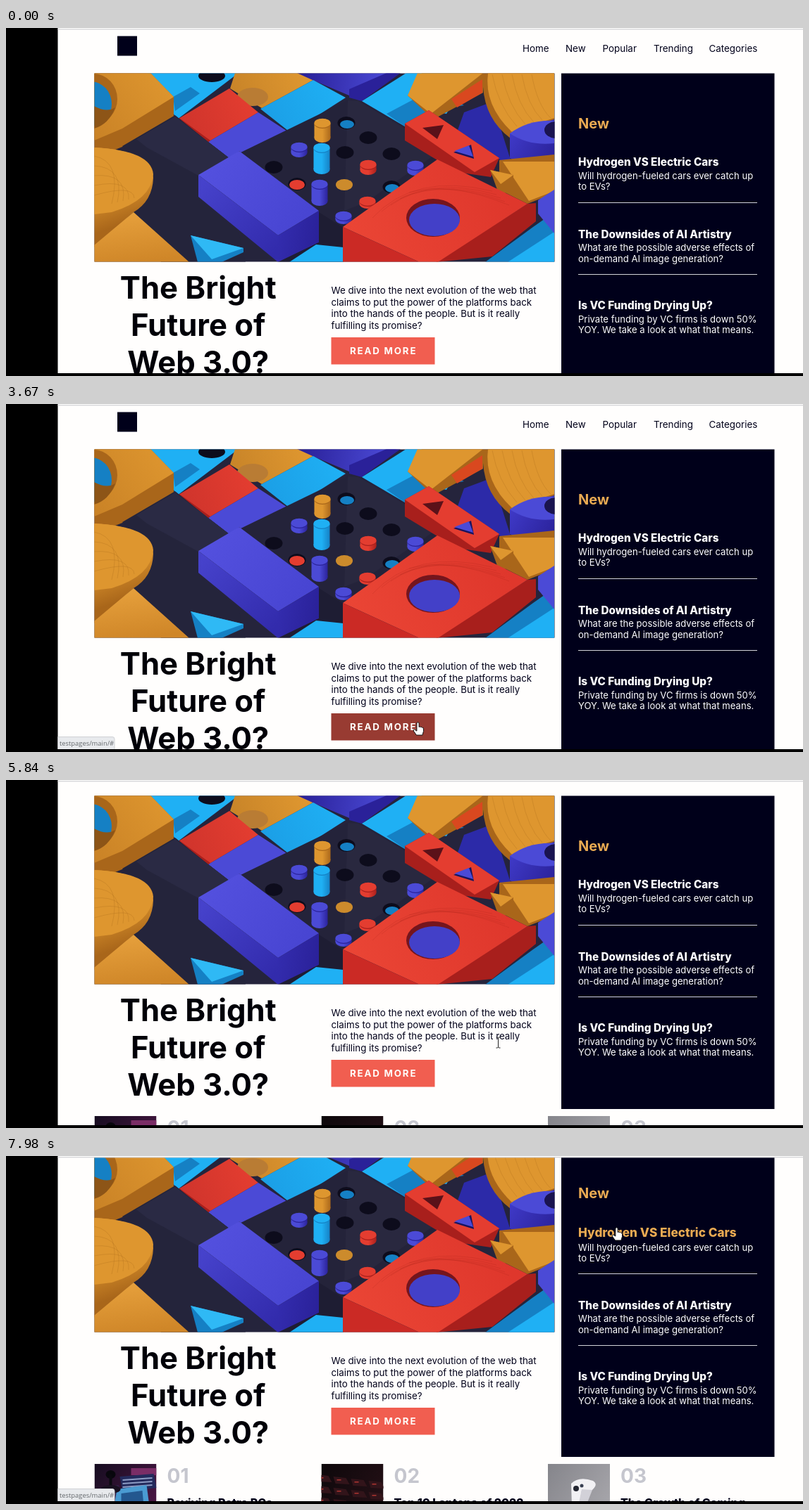
Animation of 1131x495 px, one loop 8000 ms. Source, as an HTML page with a canvas:

```html
<!DOCTYPE html>
<html lang="en">
<head>
<meta charset="utf-8">
<title>News page</title>
<style>
html, body { margin: 0; width: 100%; height: 100%; overflow: hidden; background: #000; }
canvas { display: block; width: 1131px; height: 495px; }
</style>
</head>
<body>
<canvas id="stage" width="1131" height="495"></canvas>
<script>
const ctx = document.getElementById('stage').getContext('2d');
const LOOP = 8000;
const NAVY = [0, 0, 26], BLACK = [0, 0, 0], RED = [241, 94, 80], GOLD = [233, 170, 82], WHITE = [255, 255, 255];
const PAPER = '#fffefd';
const ORANGE = '#de962f', RUST = '#a9661a', INDIGO = '#4b4ad6', DEEP = '#2a2199';
const CYAN = '#1fb0f4', SEA = '#1580c4', SCARLET = '#e43d30', BRICK = '#a81f1c', COAL = '#25243c', PIT = '#0d0c1c';

const clamp = v => Math.max(0, Math.min(1, v));
const smooth = v => v * v * (3 - 2 * v);
const span = (t, a, b) => clamp((t - a) / (b - a));
const rgb = c => `rgb(${c.map(Math.round)})`;
const mix = (a, b, p) => rgb(a.map((v, i) => v + (b[i] - v) * p));

// the CSS "ease" curve
function ease(x) {
  let lo = 0, hi = 1, s = x;
  for (let i = 0; i < 18; i++) {
    s = (lo + hi) / 2;
    const q = 1 - s;
    if (.75 * s * q + s ** 3 < x) lo = s; else hi = s;
  }
  const q = 1 - s;
  return .3 * s * q * q + 3 * s * s * q + s ** 3;
}

// rises after `on`, falls after `off`
const hover = (t, on, off, ms) => ease(span(t, on, on + ms)) - ease(span(t, off, off + ms));

function text(str, x, y, size, weight, color, align = 'left', gap = 0) {
  ctx.font = `${weight} ${size}px Inter, Arial, sans-serif`;
  ctx.textAlign = align;
  ctx.letterSpacing = gap + 'px';
  ctx.fillStyle = color;
  ctx.fillText(str, x, y);
}

function box(x, y, w, h, color) {
  ctx.fillStyle = color;
  ctx.fillRect(x, y, w, h);
}

function blend(x0, y0, x1, y1, ...tones) {
  const g = ctx.createLinearGradient(x0, y0, x1, y1);
  tones.forEach((c, i) => g.addColorStop(i / (tones.length - 1), c));
  return g;
}

function shape(d, color) {
  ctx.fillStyle = color;
  ctx.fill(new Path2D(d));
}

function oval(x, y, rx, ry, color) {
  ctx.fillStyle = color;
  ctx.beginPath();
  ctx.ellipse(x, y, rx, ry, 0, 0, 7);
  ctx.fill();
}

function peg(x, y, h, top, side) {
  const body = blend(x - 12, y, x + 12, y, top, top, side);
  oval(x, y + h, 11.5, 7, body);
  box(x - 11.5, y, 23, h, body);
  oval(x, y, 11.5, 7, side);
  oval(x, y - .8, 11.5, 6.5, top);
}

function clipTo(x, y, w, h) {
  ctx.beginPath();
  ctx.rect(x, y, w, h);
  ctx.clip();
}

function blocks() {
  ctx.save();
  clipTo(125.5, 64.5, 653, 268);
  box(125, 64, 654, 269, COAL);
  // back row
  shape('M200 64H330L243 130Z', CYAN);
  shape('M237 98L262 84L275 93L240 118Z', SEA);
  shape('M325 64H420L436 74L363 114L318 86Z', blend(330, 100, 420, 64, '#c98529', ORANGE));
  oval(350, 98, 22, 13, '#b97c34');
  oval(292, 68, 19, 9, PIT);
  shape('M413 64H555L487 96L435 74Z', blend(420, 64, 540, 80, DEEP, INDIGO));
  shape('M487 87L540 64H560L505 104L487 99Z', DEEP);
  shape('M505 104L568 64H660L625 122L600 117L566 140Z', CYAN);
  shape('M540 122L600 90L650 110L600 117L566 140Z', SEA);
  shape('M590 64H677V92L606 130L570 96Z', RUST);
  shape('M584 64H677L603 122L570 96Z', ORANGE);
  shape('M632 101L676 73V92L640 113Z', '#d9481f');
  // right side
  shape('M650 120L690 105L720 200L700 187L640 148Z', '#2c2aa8');
  shape('M677 64H778V138L716 157Q680 130 677 84Z', RUST);
  shape('M684 64H778V128L718 148Q678 110 684 64Z', ORANGE);
  shape('M715 150L778 130V196L738 196L715 185Z', blend(715, 150, 778, 190, '#3f3ac8', DEEP));
  shape('M715 150Q742 130 778 132V164Q742 168 715 150Z', INDIGO);
  oval(781, 145, 17, 12, '#1a1450');
  shape('M700 188L778 180V235L740 250L700 230Z', RUST);
  shape('M705 190L778 190V232L742 246Z', ORANGE);
  // tiles
  shape('M243 130L317 86L358 120L287 162Z', blend(250, 140, 350, 100, '#cf342c', SCARLET));
  shape('M287 162L358 120L404 150L345 186L331 175L318 186Z', INDIGO);
  shape('M361 115L436 74L482 99L404 149Z', blend(370, 130, 470, 80, '#1b9fe6', CYAN));
  shape('M243 130L246 128L290 160L287 162Z', BRICK);
  // left orange arch and disc
  shape('M125 64H205L238 98V126L165 169L125 185Z', RUST);
  shape('M125 64H205L238 98L165 143L125 160Z', blend(125, 160, 238, 80, '#c98226', ORANGE));
  oval(124, 101, 34, 36, RUST);
  oval(120, 108, 30, 32, SEA);
  shape('M125 111Q143 121 155 113Q146 137 125 143Z', '#8d5517');
  shape('M165 168L240 124L287 162L318 186L273 210L274 245L330 290L340 333H220L180 262L210 215Z', '#24243b');
  shape('M240 126L287 162L318 186L273 210L200 170L185 158Z', '#2a2a44');
  shape('M125 170Q206 174 209 213Q208 246 181 262L125 312Z', blend(170, 215, 190, 270, ORANGE, RUST));
  shape('M125 170Q206 174 209 208Q206 245 150 262L125 265Z', ORANGE);
  shape('M125 309L181 262L260 333H125Z', blend(181, 262, 190, 333, '#e6a03c', '#cf8628'));
  // peg board
  shape('M485 103L620 172L610 200L478 288L440 262L331 178Z', '#24233a');
  shape('M485 103L500 104L618 174L510 248L480 260Z', '#29283f');
  const holes = [[483, 135], [514, 156], [481, 177], [547, 179], [380, 198], [547, 226]];
  holes.forEach(([x, y], i) => {
    oval(x, y, 12.5, 9, PIT);
    if (i === 0 || i === 5) oval(x + 1, y + 2, 10, 6, SEA);
  });
  peg(449, 136, 20, ORANGE, RUST);
  peg(416, 170, 7, INDIGO, DEEP);
  peg(514, 195, 7, SCARLET, BRICK);
  peg(581, 196, 7, INDIGO, DEEP);
  peg(448, 171, 30, CYAN, SEA);
  oval(413, 222, 12.5, 9, PIT);
  oval(413, 223, 11, 7, SCARLET);
  oval(480, 223, 12, 8, '#cc8b2c');
  peg(513, 247, 3, SCARLET, BRICK);
  peg(445, 223, 23, INDIGO, DEEP);
  peg(479, 268, 4, INDIGO, DEEP);
  // indigo beam
  shape('M273 209L331 175L444 260L386 295Z', blend(290, 190, 420, 275, '#5350de', '#4845d2'));
  shape('M386 295L444 260V305L386 333Z', blend(386, 290, 444, 300, '#332cae', DEEP));
  shape('M273 209L386 295V333L273 240Z', blend(280, 220, 380, 320, '#4642cb', '#322bac'));
  // front corner pieces
  shape('M444 262L479 284V333H386L444 305Z', '#1e1d33');
  shape('M402 333L440 308L479 312V333Z', CYAN);
  shape('M262 295L337 313V319L306 333H272Z', SEA);
  shape('M262 295L337 313L292 329Z', '#2fb9f5');
  // red blocks
  shape('M566 136L600 117L700 185L688 212L640 205L566 160Z', BRICK);
  shape('M566 136L600 117L700 185L665 205Z', SCARLET);
  shape('M591 142L621 138L612 158Z', '#5b1119');
  shape('M635 177L660 166L664 186Z', '#19145e');
  shape('M636 175L657 167L663 183Z', INDIGO);
  shape('M687 202L720 209V230L700 238Z', RUST);
  shape('M687 202L720 209L702 222Z', ORANGE);
  shape('M680 333L748 283L778 262V333Z', SEA);
  shape('M712 333L778 290V333Z', CYAN);
  shape('M755 245L778 230V292L755 264Z', INDIGO);
  shape('M740 250L752 249V275L690 325L610 333Z', BRICK);
  shape('M478 283L612 187L740 250L602 340Z', blend(490, 300, 700, 210, '#ea4535', '#df372c'));
  shape('M478 283L602 340H478Z', '#cb2a25');
  oval(606, 270, 38, 27, '#75151d');
  oval(608, 273, 36, 23, '#4340c8');
  // light grain on the big faces
  ctx.lineWidth = .7;
  for (let i = 0; i < 5; i++) {
    ctx.strokeStyle = 'rgba(120,20,10,.18)';
    ctx.stroke(new Path2D(`M${520 + i * 13} ${270 - i * 9}Q${580 + i * 12} ${205 + i * 3} ${690 + i * 6} ${232 + i * 5}`));
    ctx.strokeStyle = 'rgba(120,70,10,.22)';
    ctx.stroke(new Path2D(`M125 ${182 + i * 14}Q${165 + i * 4} ${190 + i * 8} ${150 + i * 8} ${250 - i * 2}`));
    ctx.stroke(new Path2D(`M${690 + i * 14} 66Q${698 + i * 14} 110 ${725 + i * 12} ${140 - i * 3}`));
  }
  ctx.restore();
}

function thumb(x, tones, draw) {
  ctx.save();
  ctx.translate(x, 520);
  clipTo(0, 0, 88, 120);
  box(0, 0, 88, 120, blend(0, 0, 88, 60, ...tones));
  draw();
  ctx.restore();
}

function thumbs() {
  thumb(125.5, ['#160d20', '#4c1745'], () => {
    box(52, 6, 36, 10, '#7a2d66');
    shape('M0 36L34 30L46 60H0Z', '#33204a');
    shape('M36 18L84 14L88 34L40 40Z', '#232a5c');
    for (let i = 0; i < 3; i++) shape(`M40 ${22 + i * 5}l42 -3v2l-42 3Z`, '#8d9cc4');
    shape('M32 36L74 30L78 60H28Z', '#4a9bd2');
    shape('M38 42L68 38L70 60H38Z', '#23578f');
    oval(23, 15, 7, 6, '#08070d');
    box(21, 15, 4, 20, '#0b0910');
    oval(23, 36, 14, 6, '#181020');
  });
  thumb(447.5, ['#0d080b', '#251016'], () => {
    for (let i = 0; i < 12; i++) {
      const x = (i % 4) * 25 - 8, y = 15 + Math.floor(i / 4) * 16 + (i % 4) * 3;
      shape(`M${x} ${y}l18 2l5 9l-20 -1Z`, '#32141a');
      box(x + 5, y + 4, 6, 1.5, '#ad3530');
    }
  });
  thumb(769, ['#85858b', '#a7a6ab'], () => {
    shape('M33 28Q44 17 64 24Q72 29 63 37L48 38L44 60H34Z', '#f2f1f4');
    shape('M48 36L63 37L54 60H43Z', '#d2d1d8');
    oval(40, 35, 4, 4, '#242631');
    oval(48, 31, 2.5, 2.5, '#394052');
  });
  const cards = [[228.5, '01', 'Reviving Retro PCs'], [550.5, '02', 'Top 10 Laptops of 2022'], [872, '03', 'The Growth of Gaming']];
  for (const [x, num, title] of cards) {
    text(num, x, 547, 28, 700, '#c5c6ce');
    text(title, x, 580.5, 16, 800, '#00001a');
  }
}

function sidebar(grow) {
  box(788, 64.5, 302.5, 445.5, '#00001a');
  const up = Math.round(grow), two = Math.round(grow * 2);
  text('New', 812, 143 - up, 20, 700, rgb(GOLD));
  const items = [
    ['Hydrogen VS Electric Cars', 196, 'Will hydrogen-fueled cars ever catch up', 'to EVs?'],
    ['The Downsides of AI Artistry', 298.5, 'What are the possible adverse effects of', 'on-demand AI image generation?'],
    ['Is VC Funding Drying Up?', 400, 'Private funding by VC firms is down 50%', 'YOY. We take a look at what that means.']
  ];
  items.forEach(([title, y, a, b], i) => {
    const hot = i ? 0 : grow;
    const dy = i ? up : two;
    text(title, 812, y + up, 15.27 + 1.93 * hot, 800, mix(WHITE, GOLD, hot));
    text(a, 812, y + 18.5 + dy, 13.09, 400, '#fff');
    text(b, 812, y + 34.2 + dy, 13.09, 400, '#fff');
    if (i < 2) box(812, (i ? 350 : 248) + up, 254, 1, '#d2d3d8');
  });
}

function page(t) {
  const link = hover(t, 1600, 2990, 600);
  const press = hover(t, 3530, 4665, 600);
  box(158, 11.5, 28, 28, '#00001a');
  const nav = [['Home', 733], ['New', 794], ['Popular', 846.5], ['Trending', 919], ['Categories', 997.5]];
  for (const [name, x] of nav)
    text(name, x, 34, 13.4, 400, name === 'Popular' ? mix(NAVY, RED, link) : '#00001a');
  blocks();
  ['The Bright', 'Future of', 'Web 3.0?'].forEach((s, i) => text(s, 272.7, 385 + i * 52.8, 43.6, 700, '#000008', 'center'));
  const lines = ['We dive into the next evolution of the web that', 'claims to put the power of the platforms back',
    'into the hands of the people. But is it really', 'fulfilling its promise?'];
  lines.forEach((s, i) => text(s, 461.5, 378 + i * 16.55, 13.3, 400, '#00001a'));
  box(461.5, 440, 147, 38.5, mix(RED, BLACK, press));
  text('READ MORE', 488, 464, 13.3, 700, '#fffdfa', 'left', 1.82);
  sidebar(ease(span(t, 7070, 7970)));
  thumbs();
}

function status(t) {
  const on = (a, b) => span(t, a, a + 140) - span(t, b, b + 140);
  const alpha = on(1600, 2990) + on(3530, 4665) + on(7075, 9000);
  if (alpha <= 0) return;
  ctx.globalAlpha = alpha;
  ctx.beginPath();
  ctx.roundRect(70, 473.5, 84, 20, 3);
  ctx.fillStyle = '#e8eaed';
  ctx.fill();
  ctx.lineWidth = 1;
  ctx.strokeStyle = '#cfd1d4';
  ctx.stroke();
  ctx.font = '9.4px "Open Sans", sans-serif';
  ctx.textAlign = 'left';
  ctx.letterSpacing = '0px';
  ctx.fillStyle = '#64686c';
  ctx.fillText('testpages/main/#', 76, 486);
  ctx.globalAlpha = 1;
}

// start, end, bend x, bend y, target x, target y
const moves = [
  [850, 1600, 1074, 150, 886, 30],
  [1600, 1890, 888, 27, 884, 27],
  [1890, 2310, 882, 29, 878, 28],
  [2910, 3630, 800, 330, 584, 452],
  [3670, 4100, 565, 455, 545, 457],
  [4100, 4510, 555, 460, 572, 455],
  [4510, 5100, 700, 440, 704, 371],
  [5100, 5420, 702, 373, 698, 373],
  [6310, 6800, 775, 250, 856, 133],
  [6800, 7070, 860, 122, 862, 113],
  [7070, 7500, 872, 105, 878, 107],
  [7500, 7980, 874, 102, 866, 101]
];

function pointer(t) {
  let x = 1074, y = 492;
  for (const [a, b, cx, cy, ex, ey] of moves) {
    if (t < a) break;
    const s = smooth(span(t, a, b)), q = 1 - s;
    x = q * q * x + 2 * q * s * cx + s * s * ex;
    y = q * q * y + 2 * q * s * cy + s * s * ey;
  }
  return [x, y];
}

const HAND = new Path2D('M-1.6 1.2Q0-.8 1.6 1.2V7Q3 5.8 4.1 7.2Q5.6 6.4 6.4 8Q8 7.6 8 9.4V13L6.4 18.5H-2L-6.2 12.6Q-6.8 10.6-4.8 10.4L-1.6 12.6Z');
const ARROW = new Path2D('M0 0V16.5L3.9 12.8L6.6 18.8L9.2 17.6L6.6 11.8H11.8Z');
const BEAM = new Path2D('M-3-7.5H-1L0-6.5L1-7.5H3M0-6.5V6.5M-3 7.5H-1L0 6.5L1 7.5H3');
const kinds = [[850, ARROW], [1600, HAND], [2990, ARROW], [3530, HAND], [4665, ARROW], [5000, BEAM],
  [6400, ARROW], [6720, BEAM], [7070, HAND]];

function cursor(t) {
  if (t < 850) return;
  const kind = kinds.filter(k => k[0] <= t).pop()[1];
  const [x, y] = pointer(t).map(Math.round);
  ctx.save();
  ctx.translate(x + .5, y + .5);
  ctx.lineWidth = 1;
  if (kind === BEAM) {
    ctx.strokeStyle = x > 788 ? '#d8d8dc' : '#222';
  } else {
    ctx.strokeStyle = '#111';
    ctx.fillStyle = '#fff';
    ctx.fill(kind);
  }
  ctx.stroke(kind);
  ctx.restore();
}

function draw(now) {
  const t = now % LOOP;
  box(0, 0, 1131, 495, '#000');
  box(73.5, 0, 1058, 491, PAPER);
  ctx.save();
  clipTo(73.5, 2, 1058, 489);
  ctx.translate(0, -Math.round(82 * smooth(span(t, 5726, 5950))));
  page(t);
  ctx.restore();
  box(73.5, 1, 1058, 1.5, '#d9dadc');
  ctx.save();
  clipTo(73.5, 0, 1058, 491);
  status(t);
  ctx.restore();
  cursor(t);
}

let start;
function tick(now) {
  start ??= now;
  draw(now - start);
  requestAnimationFrame(tick);
}
requestAnimationFrame(tick);
</script>
</body>
</html>
```
